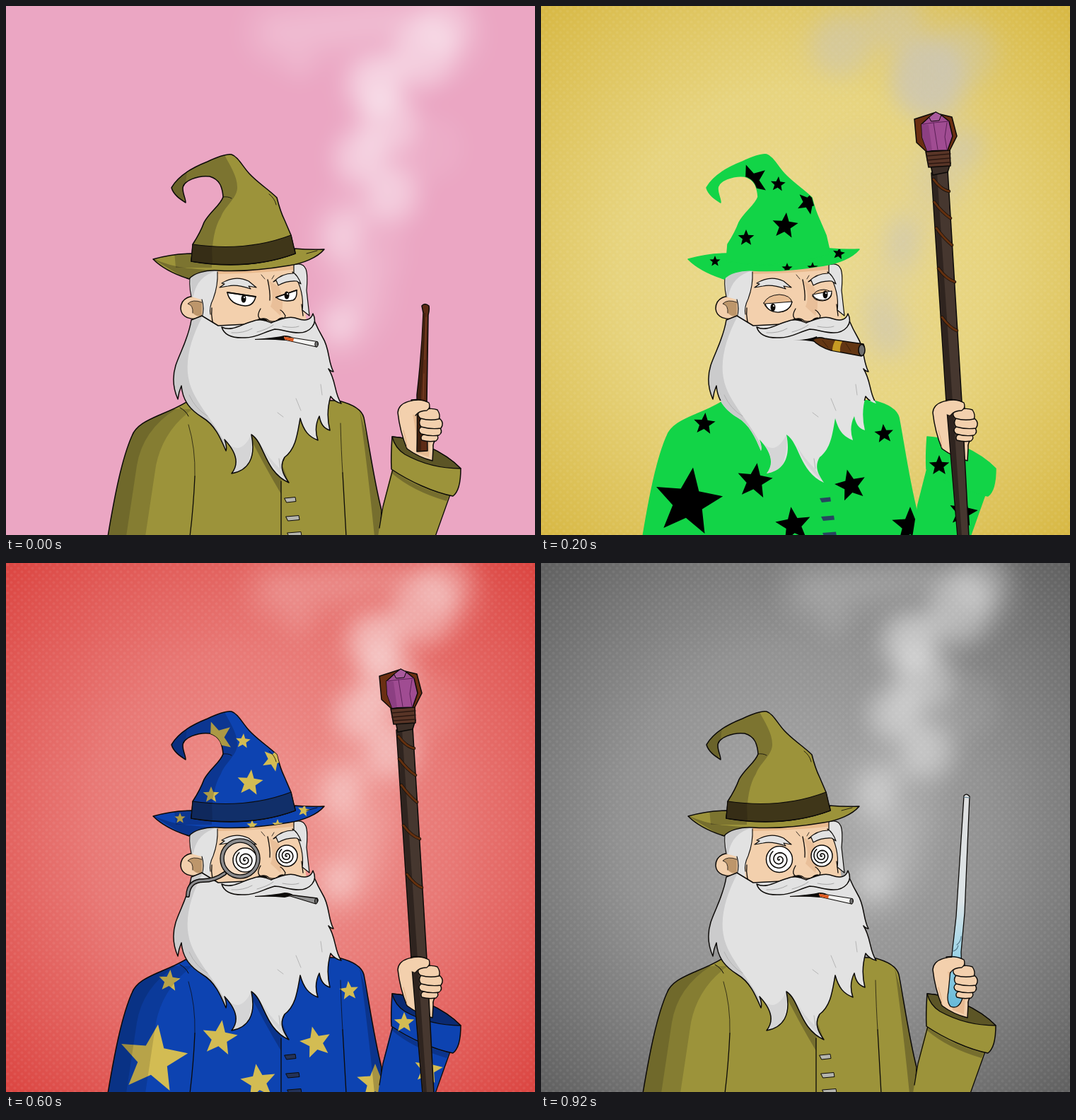
Write an HTML page that moves like this. It is 748 by 748 pixels and loops after 1 s.

```html
<!DOCTYPE html>
<html lang="en">
<head>
<meta charset="utf-8">
<title>Wizard wardrobe</title>
<style>
html, body { margin: 0; width: 100%; height: 100%; overflow: hidden; }
svg { display: block; width: 100%; height: 100%; }
</style>
</head>
<body>
<svg id="stage" viewBox="0 0 748 748" stroke-linecap="round" stroke-linejoin="round"></svg>
<script>
const INK = '#0c0a08', SKIN = '#f3d0ad', TAN = '#dfae82', HAIR = '#e2e2e2', HAIR_DARK = '#cbcbcc';

const shape = (d, fill, more = '') => `<path d="${d}" fill="${fill}" ${more}/>`;
const edged = (d, fill, color = INK, w = 1.5) => shape(d, fill, `stroke="${color}" stroke-width="${w}"`);
const inked = (d, fill, w) => edged(d, fill, INK, w);
const line = (d, color = INK, w = 1.3, more = '') =>
  shape(d, 'none', `stroke="${color}" stroke-width="${w}" ${more}`);
const oval = (x, y, rx, ry, fill, more = '') =>
  `<ellipse cx="${x}" cy="${y}" rx="${rx}" ry="${ry}" fill="${fill}" ${more}/>`;
const inkEdge = `stroke="${INK}" stroke-width="1.5"`;

const HAT = 'M254 278C246 273 237 267 234 257C242 242 262 229 285 220C300 213 312 209 319 210C328 213 334 226 344 237C356 250 372 260 383 271C386 283 389 293 394 303L403 324L409 350Q345 374 262 361L264 337Q275 320 280 306C289 290 303 282 307 270C306 256 302 245 288 241C272 239 250 247 250 258C250 266 254 272 254 278Z';
const BRIM = 'M208 358Q235 350 263 350L262 361Q340 375 409 350L408 343Q430 345 450 344C440 356 420 364 400 367C370 372 330 376 299 374C282 373 265 378 259 386C240 380 222 372 208 358Z';
const BAND = 'M264 337Q340 348 403 324L409 350Q345 374 262 361Z';
const BODY = 'M144 750C154 690 164 640 178 608C184 592 202 585 220 577Q245 567 262 556L470 558Q502 566 506 582C512 612 520 670 531 713L529 750Z';
const SLEEVE = 'M547 650L533 705L526 750H607L628 691Z';
const CUFF = 'M546 609Q544 635 545 655C570 672 605 688 632 693Q643 685 643 654C620 630 575 610 546 609Z';
const CUFF_INSIDE = 'M546 609C575 610 620 630 643 654Q600 654 564 634Q550 625 546 609Z';
const BEARD = 'M262 444C258 470 246 490 240 508C235 524 236 540 243 556Q244 546 248 537C250 560 262 572 278 582C295 592 303 610 311 629Q313 623 309 613C324 629 331 646 319 661C342 657 354 640 347 606C366 618 365 658 400 674C390 660 387 650 394 638C410 626 412 605 416 583C421 601 428 609 441 614Q435 596 443 580C445 591 449 597 458 600Q452 576 459 552Q465 560 474 562C464 548 467 530 456 513Q460 517 463 517C455 503 458 485 448 469Q441 457 436 445L300 452L277 438Z';

function star(x, y, r, turn = 0) {
  const pts = Array.from({ length: 10 }, (_, i) => {
    const a = (turn - 90 + i * 36) * Math.PI / 180, k = i % 2 ? r * 0.44 : r;
    return (x + k * Math.cos(a)).toFixed(1) + ' ' + (y + k * Math.sin(a)).toFixed(1);
  });
  return 'M' + pts.join('L') + 'Z';
}
const HAT_STARS = [[298, 247, 24, -20], [335, 252, 11, 5], [378, 278, 17, 25], [345, 311, 19, 6],
  [290, 328, 12, 0], [246, 361, 8, 0], [421, 350, 9, 10], [348, 371, 8, 0], [384, 370, 8, 0]];
const COAT_STARS = [[231, 591, 16, 5], [208, 702, 50, 8], [302, 672, 26, 8], [357, 734, 26, -8],
  [438, 678, 23, -13], [485, 605, 14, -5], [522, 735, 27, 0]];
const CUFF_STARS = [[563, 650, 15, 0], [597, 716, 21, 10]];
const stars = (list, color) => color ? shape(list.map(s => star(...s)).join(''), color) : '';

// A trail is a blurred column with puffs (x, y, radius, opacity) along it.
const WISPS = {
  color: '#fff',
  column: 'M472 452Q512 420 495 370Q455 320 500 295Q575 270 508 215Q552 160 518 115Q560 75 625 48Q640 18 520 24L385 38',
  puffs: [[472, 450, 26, .28], [475, 325, 30, .24], [547, 265, 36, .28], [498, 215, 34, .3],
    [605, 200, 42, .08], [540, 165, 42, .28], [522, 110, 38, .36], [592, 65, 46, .3], [622, 26, 38, .2],
    [540, 350, 32, .06], [415, 82, 24, .1]]
};
const HAZE = {
  color: '#cbc6bb',
  column: 'M490 470Q470 430 512 335Q570 250 590 200Q545 120 600 60Q500 5 410 60',
  puffs: [[492, 465, 28, .4], [480, 428, 26, .35], [512, 322, 24, .4], [511, 352, 24, .35],
    [562, 235, 42, .25], [547, 102, 52, .75], [425, 55, 42, .4], [500, 20, 38, .35], [602, 70, 42, .3],
    [600, 200, 24, .45], [450, 230, 50, .1]]
};
const smoke = ({ color, column, puffs }) => '<g filter="url(#soft)">' +
  line(column, color, 46, 'opacity=".16"') + line(column, color, 105, 'opacity=".09"') +
  puffs.map(([x, y, r, o]) => oval(x, y, r, r * 1.1, color, `opacity="${o}"`)).join('') + '</g>';

const BACKDROPS = {
  pink: ['#eba6c3', '#eba6c3', '#eba6c3'],
  gold: ['#ead98c', '#e7d47f', '#d8b946'],
  red: ['#ed8d89', '#e87875', '#dc4743'],
  grey: ['#a3a3a3', '#929292', '#626262']
};
const backdrop = name => `<rect width="748" height="748" fill="url(#${name})"/>` +
  (name === 'pink' ? '' : '<rect width="748" height="748" fill="url(#dots)"/>');

const OUTFITS = {
  olive: { main: '#9c933a', band: '#3f3619', button: '#b5b5ae', shade: .25 },
  black: { main: '#393939', band: '#120e0c', button: '#606060', shade: .36 },
  green: { main: '#12d447', button: '#27465f', star: '#000', flat: true },
  blue: { main: '#0d43b1', band: '#112f69', button: '#233258', star: '#d3bc53', shade: .22 }
};
const clipped = (id, content) => `<g clip-path="url(#${id})">${content}</g>`;
const dark = (d, o) => shape(d, '#06000a', `opacity="${o}"`);

function coat(o) {
  const buttons = [[394, 695, 15], [396, 721, 18], [398, 744, 19]].map(([x, y, w]) => {
    const d = `M${x} ${y + 1}L${x + w} ${y - .5}L${x + w + 1} ${y + 5.5}L${x + 3} ${y + 7}Z`;
    return o.flat ? shape(d, o.button) : inked(d, o.button, 1);
  }).join('');
  const inside = edged(BODY, o.main, o.main) + stars(COAT_STARS, o.star) + (o.flat ? '' :
    dark('M135 750L160 570H264Q222 600 212 650L197 750Z', o.shade * .6) +
    dark('M135 750L160 570H240Q193 600 185 650L170 750Z', o.shade * .65) +
    dark('M500 572Q511 650 521 750H535V700Z', o.shade) +
    dark('M340 600Q365 650 389 690V670L400 674L380 620Z', o.shade));
  return (o.flat ? inside : clipped('bodyClip', inside) + line(BODY, INK, 1.5) +
    line('M258 592Q268 625 267 665M473 590Q474 630 476 660', INK, .7) +
    line('M267 665Q265 710 260 750M476 660L481 750M389 672V750') +
    line('M246 568Q254 572 258 580', INK, 1)) + buttons;
}

function sleeve(o) {
  if (o.flat) return edged(SLEEVE, o.main, o.main) + edged(CUFF, o.main, o.main) + stars(CUFF_STARS, o.star);
  return shape(SLEEVE, o.main) + line('M547 655L533 708L528 738M628 691L607 750') +
    dark('M547 657Q582 682 626 693L623 700Q575 686 546 661Z', o.shade) +
    inked(CUFF, o.main) + stars(CUFF_STARS, o.star) +
    shape(CUFF_INSIDE, o.main) + dark(CUFF_INSIDE, o.shade * 1.7) + line(CUFF_INSIDE);
}

function hat(o) {
  const print = clipped('hatClip', stars(HAT_STARS, o.star));
  if (o.flat) return edged(HAT, o.main, o.main) + edged(BRIM, o.main, o.main) + print;
  return inked(BRIM, o.main) + inked(HAT, o.main) + print +
    clipped('hatClip',
      dark('M225 200H304C312 220 328 238 327 258C326 272 309 284 304 298Q290 320 291 370H240Z', o.shade * .85) +
      dark('M225 290V250L256 234L250 280Z', o.shade * .6) +
      dark('M205 356Q235 370 262 371Q278 373 299 374L258 388Z', o.shade)) +
    inked(BAND, o.band, 1.1) +
    dark('M264 337L291 340L292 365L262 361Z', o.shade * .6) +
    line('M307 270Q314 269 319 272M372 266Q380 272 382 281M425 350L440 346', INK, .8);
}

function head() {
  return inked('M279 414C264 406 247 412 247 428C248 441 263 445 279 441Z', SKIN) +
    shape('M277 419Q264 414 257 421Q265 423 264 434Q270 440 277 438Z', '#bd966b') +
    line('M277 419Q264 414 257 421Q265 423 264 434', INK, .8) +
    shape('M284 372L414 364L422 420L425 448L350 462L298 464L285 450Z', SKIN) +
    shape('M296 370L412 362L413 372Q360 378 297 379Z', '#e9ba8e') +
    shape('M371 388Q381 410 374 425L388 438Q395 420 386 397Z', '#e9bf99') +
    shape('M261 372Q258 394 262 411L276 415Q281 428 276 441L290 452Q286 432 293 414Q300 395 299 374Z', HAIR) +
    shape('M261 372L299 374Q270 382 265 410L262 411Z', HAIR_DARK) +
    line('M261 374Q258 394 262 411M277 415Q281 428 277 441M299 376Q300 395 293 414Q287 426 289 436', INK, 1.1) +
    line('M291 427Q289 446 298 460Q304 465 312 462M418 422L420 438') +
    inked('M407 366Q420 362 424 372Q427 380 425 402L429 438L419 430Q422 404 407 378Z', HAIR, 1.2);
}

const NOSE = line('M370 387Q374 405 373 416M360 428Q353 440 361 443Q366 440 372 445Q379 448 386 443Q394 445 395 438Q391 431 388 430') +
  shape('M355 443Q364 439 370 445Q362 449 355 443ZM384 443Q390 438 396 442Q392 447 384 443Z', INK);

const BROWS = inked('M302 398L309 393L305 392Q324 380 343 389L354 398L343 396L346 400Q326 393 314 396Z', HAIR, 1.2) +
  inked('M382 388L378 390Q390 378 406 378L405 376Q413 381 417 393L411 389Q397 388 385 395Z', HAIR, 1.2) +
  line('M366 386L361 380M376 386L379 381', INK, .8);

function beard(flat) {
  return shape(BEARD, HAIR) + clipped('beardClip',
      shape('M230 430H283C262 465 253 500 258 526C263 560 300 590 318 635L290 620L225 560Z', HAIR_DARK) +
      shape('M309 613Q336 640 318 662L340 655Q350 625 347 606Q330 640 309 613ZM362 622Q372 650 400 674L388 655Q372 640 362 622Z', HAIR_DARK, 'opacity=".55"')) +
    line(BEARD, INK, 1.5, flat ? 'clip-path="url(#upper)"' : '') +
    line('M259 550Q268 570 285 580M384 575L392 581M410 555L417 572M445 535L447 550M386 640L388 654', '#aaa', .8);
}
const MUSTACHE = inked('M305 454C319 461 333 450 348 446C361 441 370 446 375 448C386 444 400 437 412 442Q430 448 434 435C442 450 429 462 414 462C400 462 390 457 380 457C364 461 355 469 338 469C319 470 308 464 305 454Z', HAIR) +
  line('M319 462Q336 463 348 456M355 461Q370 457 378 451M391 453Q406 456 414 453', '#999', .8);

function spiral(x, y, r) {
  let d = '';
  for (let i = 0; i <= 64; i++) {
    const a = i * .25 + .6, k = r * .78 * i / 64;
    d += (i ? 'L' : 'M') + (x + k * Math.cos(a)).toFixed(1) + ' ' + (y + k * Math.sin(a)).toFixed(1);
  }
  return oval(x, y, r, r, '#fff', inkEdge) + line(d, INK, 1.6);
}

const pupil = (x, y, rx = 3.5, ry = 5.5) => oval(x, y, rx, ry, INK) + oval(x + 1, y - 2, .9, 1.2, '#fff');
const CORD = 'M309 439Q295 449 279 449Q258 449 257 470';
const EYES = {
  sly: inked('M313 405L353 411Q350 424 338 424Q316 422 313 405Z', '#fff') +
    line('M313 405L353 411M382 412L411 402', INK, 2.2) +
    inked('M382 412L411 402Q412 413 406 416Q391 419 382 412Z', '#fff') +
    pupil(336, 414) + pupil(397, 409),
  sleepy: inked('M315 420Q320 409 337 408Q353 409 355 419Q352 433 335 433Q319 432 315 420Z', '#e8bd93', 1) +
    inked('M317 421L355 418Q352 432 335 433Q320 432 317 421Z', '#fff', 1.2) +
    inked('M384 410Q388 401 400 401Q410 402 411 407Q410 416 398 417Q386 417 384 410Z', '#e8bd93', 1) +
    inked('M384 408L411 403Q411 415 399 416Q387 416 384 408Z', '#fff', 1.2) +
    pupil(328, 426) + pupil(402, 408),
  mask: line('M261 410L290 413', INK, 1.8) +
    inked('M289 397C291 387 306 387 320 388C344 390 352 395 369 391C388 388 403 378 416 380C427 385 426 410 420 430C411 441 398 436 388 432C372 428 358 432 346 440C326 453 302 452 293 445C286 435 284 409 289 397Z', '#5e1893') +
    shape('M289 397C291 387 306 387 316 388Q300 402 303 448Q296 449 293 445C286 435 284 409 289 397Z', '#48106f') +
    line('M374 398Q382 410 376 425M413 384Q422 386 422 400', '#b05bd8', 1.5) +
    oval(327, 416, 19, 11, '#fff', inkEdge) + oval(401, 411, 11.5, 9, '#fff', inkEdge) +
    pupil(334, 414, 4, 6) + pupil(405, 410, 3.2, 5),
  dizzy: spiral(337, 419, 18.5) + spiral(397, 414, 15),
  monocle: oval(331, 418, 25, 25, '#f6dcc4') + spiral(338, 420, 17) + spiral(397, 414, 15) +
    line(CORD, INK, 6) + line(CORD, '#8b8b8d', 3.2) +
    oval(331, 418, 25.5, 25.5, 'none', `stroke="${INK}" stroke-width="6.5"`) +
    oval(331, 418, 25.5, 25.5, 'none', 'stroke="#8b8b8d" stroke-width="3.8"')
};

const LIPS = shape('M352 471Q380 469 394 466Q402 466 407 470L394 473Q375 471 352 472Z', INK);
const MOUTHS = {
  cigarette: LIPS + inked('M392 467L440 474.5Q443 478 439 482L394 472Z', '#f4f4f2', 1.2) +
    shape('M393 467.5L407 470L406 474.5L394 471.5Z', '#dd5a20') +
    oval(439, 478.3, 2.2, 3.8, '#777', `stroke="${INK}"`),
  joint: LIPS + inked('M392 468L440 474Q443 478 438 482Z', '#929292', 1.3) +
    oval(438.5, 478, 2, 3.6, '#666', `stroke="${INK}"`),
  cigar: shape('M356 472Q375 473 390 467L392 476Q375 472 356 472Z', INK) +
    inked('M384 472Q391 467 401 470L456 478Q460 487 453 495L410 487Q393 482 384 472Z', '#633613') +
    shape('M416 473L426 474.5Q422 481 423 489L412 487Q412 480 416 473Z', '#c79a23') +
    line('M398 473L406 483M431 477L438 488', '#3f200b', 1) +
    oval(453.5, 486.5, 4.5, 8, '#6f6f6f', inkEdge),
  gasp: oval(377, 471, 5.5, 8, '#6e4039', inkEdge)
};

const WRAPS = [[555, 245, 577, 262], [556, 277, 579, 300], [559, 314, 581, 338], [562, 371, 585, 390], [567, 440, 588, 459]]
  .map(([a, b, c, d]) => `M${a} ${b}Q${a + 11} ${b + 15} ${c} ${d}`).join('');
const PROPS = {
  staff: inked('M552 236L575 232L595 560L605 750H589L573 560Z', '#46372f') +
    shape('M553 237L560 236L582 560L595 750H590L574 560Z', '#2f241f') +
    line(WRAPS, INK, 4.4) + line(WRAPS, '#64300f', 3) +
    inked('M551 225L579 222L575 235L554 239Z', '#3c2e27') +
    inked('M544 206L578 203L579 226L548 228Z', '#593527') +
    line('M546 212L579 209M546 218L579 215M548 223L579 221', '#2b1711') +
    inked('M528 160L556 151L581 157L588 184L578 204L545 206L531 193Z', '#6b2f12') +
    inked('M538 167L549 157L558 150L567 155L577 163L582 184L575 204L546 205L539 186Z', '#a04c92') +
    shape('M538 167L548 168L553 204L546 205L539 186Z', '#8c3f82') +
    line('M540 167L555 165L577 163M555 165L561 203M574 165L571 185L574 203', '#5c2057', 1) +
    inked('M549 157L558 150L566 154L563 162L552 163Z', '#a95a9d', 1),
  twig: inked('M588 424Q592 419 598 424Q599 430 597 437L595 560L596 629L581 630Q582 590 581 550Q588 490 590 434Z', '#5c2b15') +
    shape('M590 434L593 434Q591 500 587 550L587 629H582V550Q588 490 590 434Z', '#40200f') +
    line('M594 440L592 500M591 520L590 555', '#7d4326', 1),
  ice: inked('M598 329Q602 325 606 330L599 495L594 550L596 615Q591 632 579 627Q573 620 576 606L582 545L587 500Z', 'url(#ice)', 1.3) +
    line('M598 331L606 332M588 540Q594 535 594 528M582 549Q588 548 590 541', '#55798b', 1.1)
};

const PALM = inked('M554 575C555 560 577 553 597 561L600 572L612 578L610 612Q603 616 604 625L603 643Q583 638 567 626Q557 602 554 575Z', SKIN) +
  shape('M575 577Q580 600 582 632L598 638L600 612L585 576Z', TAN, 'opacity=".6"');
const FINGERS = ['M590 606H609Q613 611 608 615Q598 617 588 614Q585 609 590 606Z',
  'M587 595Q602 592 614 597Q618 603 612 607Q600 609 587 605Q581 600 587 595Z',
  'M587 583Q602 580 614 584Q620 590 615 597Q601 599 587 595Q582 589 587 583Z',
  'M585 573Q600 567 610 571Q615 579 612 584Q599 587 586 583Q580 578 585 573Z']
  .map(d => inked(d, SKIN, 1.4)).join('') +
  shape('M570 560Q585 555 598 561Q601 568 595 572Q584 573 579 579L564 574Z', SKIN) +
  line('M573 557Q587 555 598 561Q601 568 595 572Q584 572 579 579') +
  line('M562 600Q566 612 567 624', TAN, 1);

const SCENES = [
  { bg: 'pink', trail: WISPS, outfit: 'olive', eyes: 'sly', mouth: 'cigarette', prop: 'twig' },
  { bg: 'gold', trail: HAZE, outfit: 'green', eyes: 'sleepy', mouth: 'cigar', prop: 'staff' },
  { bg: 'pink', outfit: 'black', eyes: 'mask', mouth: 'gasp', prop: 'staff' },
  { bg: 'red', trail: WISPS, outfit: 'blue', eyes: 'monocle', mouth: 'joint', prop: 'staff' },
  { bg: 'grey', trail: WISPS, outfit: 'olive', eyes: 'dizzy', mouth: 'cigarette', prop: 'ice' }
];

function draw({ bg, trail, outfit, eyes, mouth, prop }) {
  const o = OUTFITS[outfit];
  return '<g display="none">' + backdrop(bg) + (trail ? smoke(trail) : '') +
    coat(o) + head() + beard(o.flat) + BROWS + EYES[eyes] + NOSE + MOUTHS[mouth] + MUSTACHE +
    hat(o) + sleeve(o) + PALM + PROPS[prop] + FINGERS + '</g>';
}

const clip = (id, d) => `<clipPath id="${id}"><path d="${d}"/></clipPath>`;
const stop = (at, color) => `<stop offset="${at}" stop-color="${color}"/>`;
const defs = '<defs>' +
  Object.entries(BACKDROPS).map(([id, [mid, ring, edge]]) =>
    `<radialGradient id="${id}" gradientUnits="userSpaceOnUse" cx="374" cy="374" r="520">${
      stop(.15, mid) + stop(.5, ring) + stop(1, edge)}</radialGradient>`).join('') +
  `<linearGradient id="ice" x1="0" y1="0" x2="0" y2="1">${
    stop(0, '#dedede') + stop(.5, '#dce3e6') + stop(.72, '#a5d7e8') + stop(1, '#66b9d8')}</linearGradient>` +
  '<pattern id="dots" width="10" height="10" patternUnits="userSpaceOnUse"><g fill="#fff" opacity=".06"><circle cx="2.5" cy="2.5" r="2"/><circle cx="7.5" cy="7.5" r="2"/></g></pattern>' +
  '<filter id="soft" filterUnits="userSpaceOnUse" x="-60" y="-60" width="868" height="868" color-interpolation-filters="sRGB"><feGaussianBlur stdDeviation="15"/></filter>' +
  clip('hatClip', HAT + BRIM) + clip('bodyClip', BODY) + clip('beardClip', BEARD) +
  clip('upper', 'M0 0H748V558H0Z') + '</defs>';

const stage = document.getElementById('stage');
stage.innerHTML = defs + SCENES.map(draw).join('');
const layers = [...stage.children].slice(1);
const start = performance.now();

function tick() {
  const now = Math.floor((performance.now() - start) % 1000 / 200);
  layers.forEach((g, i) => g.setAttribute('display', i === now ? 'inline' : 'none'));
  requestAnimationFrame(tick);
}
tick();
</script>
</body>
</html>
```
